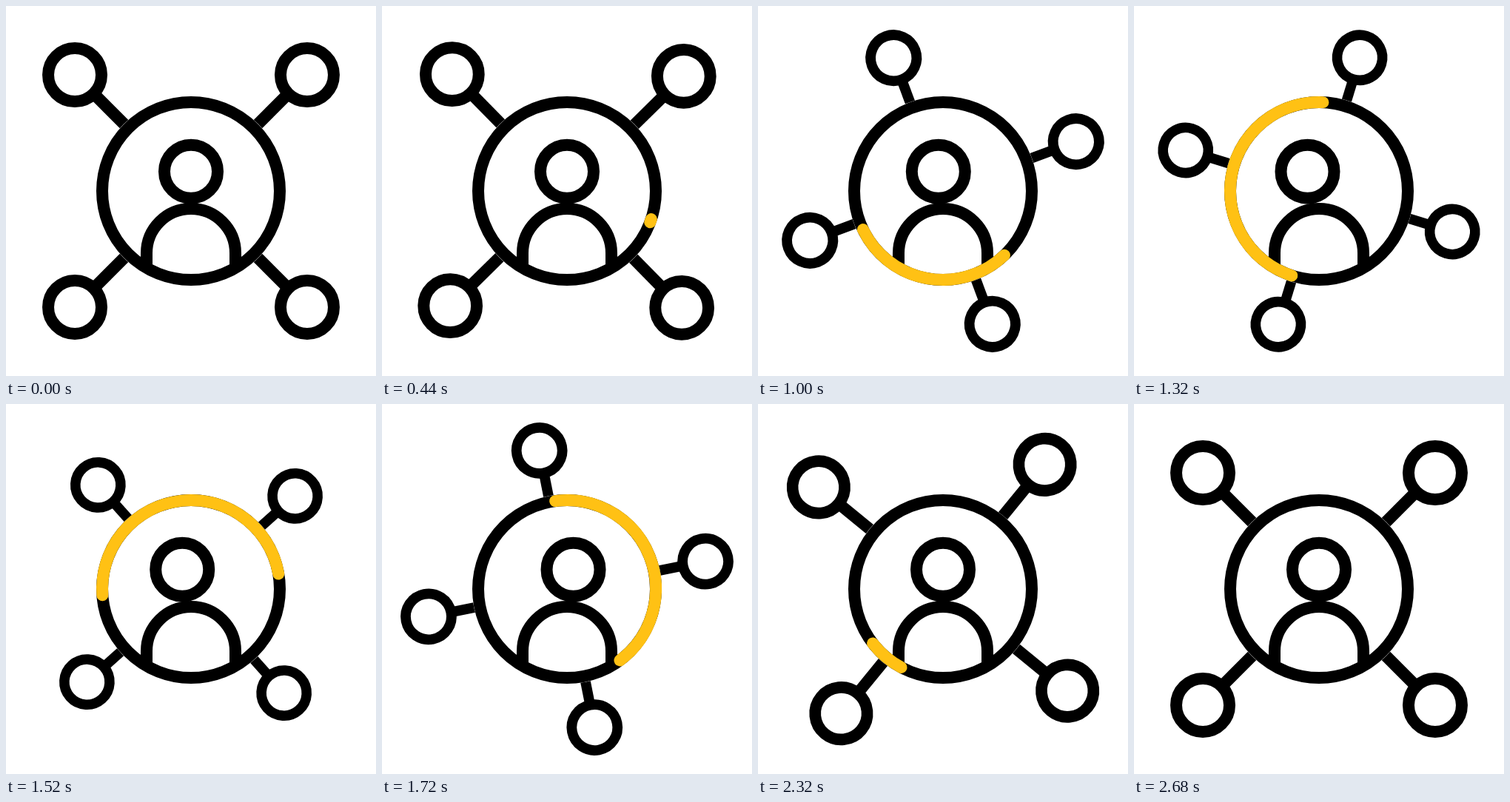
Animation of 500 by 500 pixels, one loop 3 s. Source, as an HTML page:

```html
<!DOCTYPE html>
<html lang="en">
<head>
<meta charset="utf-8">
<title>Network</title>
<style>
  html, body { margin: 0; width: 100%; height: 100%; overflow: hidden; background: #fff; }
  svg { display: block; width: 100vw; height: 100vh; }
</style>
</head>
<body>
<svg viewBox="0 0 500 500" fill="none" stroke="#000" stroke-width="16">
  <g id="orbit"></g>
  <circle cx="250" cy="250" r="128.2" fill="#fff" stroke="none"/>
  <path d="M190 352V334A60 60 0 0 1 310 334V352"/>
  <circle id="head" cx="250" cy="223.7" r="36"/>
  <circle cx="250" cy="250" r="120"/>
  <path id="arc" stroke="#ffc114" stroke-linecap="round"/>
</svg>
<script>
const LOOP = 3000, STEP = 40, START = 333, END = 2667;
const orbit = document.getElementById('orbit');
const head = document.getElementById('head');
const arc = document.getElementById('arc');

orbit.innerHTML = [45, 135, 225, 315].map(a =>
  `<g transform="rotate(${a})"><path d="M110 0H187"/><circle cx="222" r="36"/></g>`).join('');

// cubic-bezier(.52, 0, .48, 1)
function ease(x) {
  if (x <= 0) return 0;
  if (x >= 1) return 1;
  let lo = 0, hi = 1;
  for (let i = 0; i < 30; i++) {
    const s = (lo + hi) / 2, r = 1 - s;
    if (1.56 * r * r * s + 1.44 * r * s * s + s * s * s < x) lo = s; else hi = s;
  }
  return lo * lo * (3 - 2 * lo);
}
const span = (t, a, b) => ease((t - a) / (b - a));

// Smooth curve through [x, y] points
function curve(pts) {
  const n = pts.length - 1;
  const d = pts.slice(1).map((p, i) => (p[1] - pts[i][1]) / (p[0] - pts[i][0]));
  const m = pts.map((p, i) => {
    if (i === 0) return d[0];
    if (i === n) return d[n - 1];
    const h0 = p[0] - pts[i - 1][0], h1 = pts[i + 1][0] - p[0];
    return (d[i - 1] * h1 + d[i] * h0) / (h0 + h1);
  });
  return x => {
    let i = 0;
    while (i < n - 1 && x > pts[i + 1][0]) i++;
    const h = pts[i + 1][0] - pts[i][0], u = (x - pts[i][0]) / h, v = 1 - u;
    return v * v * (1 + 2 * u) * pts[i][1] + u * u * (3 - 2 * u) * pts[i + 1][1]
      + h * u * v * (v * m[i] - u * m[i + 1]);
  };
}

// Arc ends in degrees, by turn progress
const lead = curve([[0, 18], [.032, 49.4], [.137, 154.4], [.345, 272.9], [.686, 413], [.881, 477.8], [1, 511]]);
const tail = curve([[0, 18], [.032, 24], [.137, 46.3], [.345, 108], [.686, 261.6], [.881, 390.6], [1, 511]]);

function onRing(deg) {
  const a = deg * Math.PI / 180;
  return `${(250 + 120 * Math.cos(a)).toFixed(2)} ${(250 + 120 * Math.sin(a)).toFixed(2)}`;
}

function draw(t) {
  const p = span(t, START, END);
  const scale = 1 - .151 * (span(t, START, 1220) - span(t, 1467, END));
  orbit.setAttribute('transform', `translate(250 250) rotate(${180 * p}) scale(${scale})`);

  const back = span(t, 1797, 2347);
  const x = -15.8 * span(t, 672, 1405) + 25.8 * span(t, 1400, 1797) - 10 * back;
  head.setAttribute('cx', 250 + x);
  head.setAttribute('cy', 223.7 - 1.2 * Math.sin(Math.PI * back));

  if (p > 0 && p < 1) {
    const a = tail(p), b = lead(p);
    arc.setAttribute('d', `M${onRing(a)}A120 120 0 ${b - a > 180 ? 1 : 0} 1 ${onRing(b)}`);
    arc.setAttribute('visibility', 'visible');
  } else {
    arc.setAttribute('visibility', 'hidden');
  }
}

let origin = null;
function tick(now) {
  if (origin === null) origin = now;
  const t = (now - origin) % LOOP;
  draw(Math.floor(t / STEP + 1e-4) * STEP);
  requestAnimationFrame(tick);
}
draw(0);
requestAnimationFrame(tick);
</script>
</body>
</html>
```
